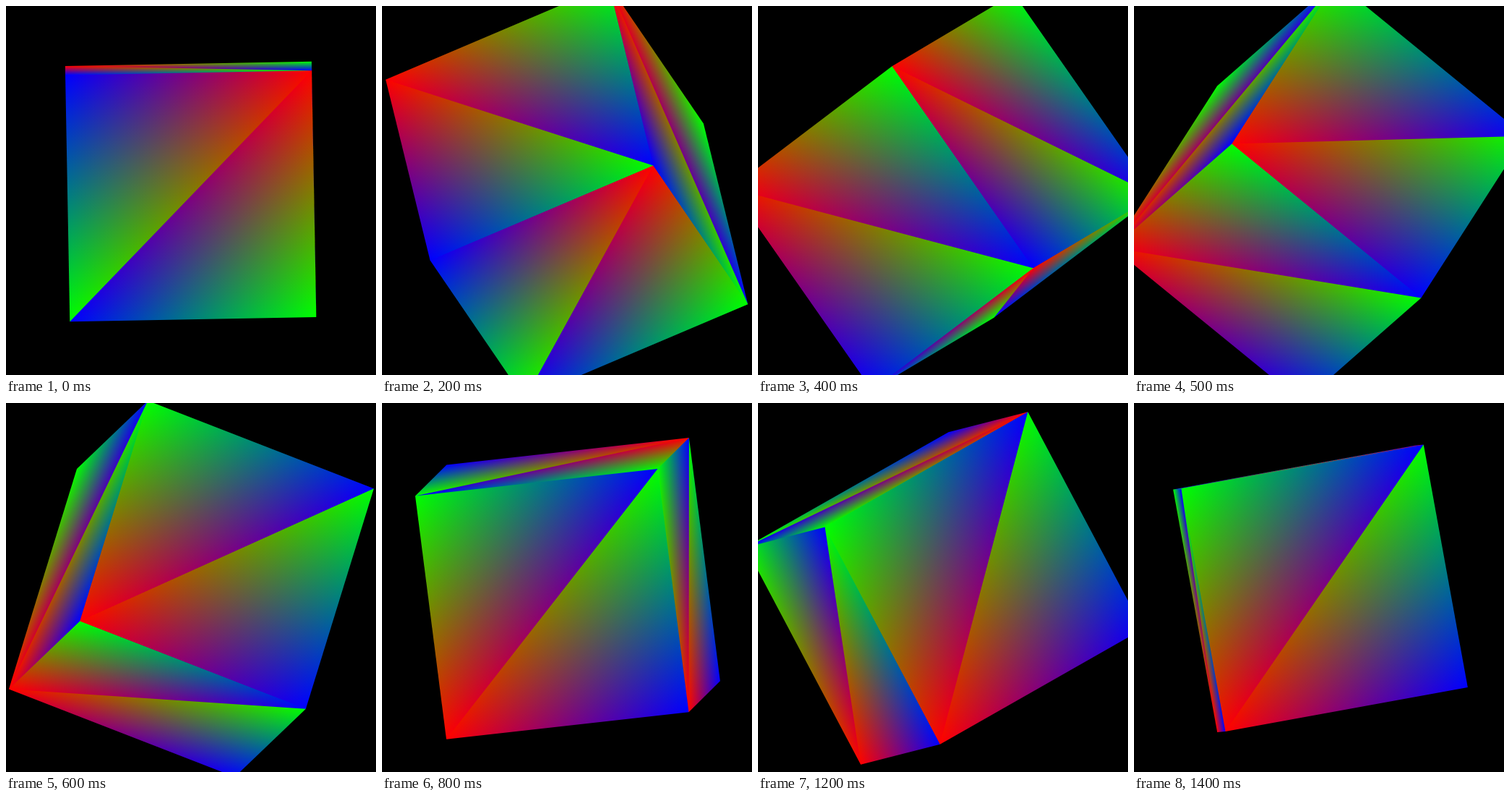
Write an HTML page with a canvas that moves like this. It is 512 px wide and 510 px high and loops after 1.5 s.

```html
<!DOCTYPE html>
<html lang="en">
<head>
<meta charset="utf-8">
<title>Rotating RGB cube</title>
<style>
  html, body { margin: 0; height: 100%; overflow: hidden; background: #000; }
  canvas { display: block; }
</style>
</head>
<body>
<canvas id="stage" width="512" height="510"></canvas>
<script>
const ctx = document.getElementById('stage').getContext('2d');
const SIZE = 341, CX = 256.8, CY = 256.5;
const PIVOT = [0.4965, 0.5, 0.5];
const STEP_MS = 100, STEPS = 15;
const START_ANGLE = 3.16, STEP_ANGLE = 0.21;
const COLORS = ['#f00', '#0f0', '#00f'];

// Corners as xyz bits, clockwise when seen from outside.
const FACES = [
  ['000', '010', '110', '100'],
  ['100', '110', '111', '101'],
  ['101', '111', '011', '001'],
  ['001', '011', '010', '000'],
  ['110', '010', '011', '111'],
  ['101', '001', '000', '100'],
];

// Turns about x, then z, then x again, all by the same angle.
function project(corner, angle) {
  const [x, y, z] = PIVOT.map((p, i) => corner[i] - p);
  const c = Math.cos(angle), s = Math.sin(angle);
  const y1 = y * c - z * s, z1 = y * s + z * c;
  const x2 = x * c + y1 * s, y2 = y1 * c - x * s;
  return [CX + SIZE * x2, CY - SIZE * (y2 * c + z1 * s)];
}

function drawTriangle(points) {
  const [a, b, c] = points;
  const area = (b[0] - a[0]) * (c[1] - a[1]) - (b[1] - a[1]) * (c[0] - a[0]);
  if (area <= 0.01) return;
  ctx.beginPath();
  points.forEach(p => ctx.lineTo(...p));
  ctx.closePath();
  // Each colour fades from its corner to the opposite edge.
  points.forEach((p, i) => {
    const q = points[(i + 1) % 3], r = points[(i + 2) % 3];
    const ex = r[0] - q[0], ey = r[1] - q[1];
    const k = area / (ex * ex + ey * ey);
    const fade = ctx.createLinearGradient(p[0], p[1], p[0] + ey * k, p[1] - ex * k);
    fade.addColorStop(0, COLORS[i]);
    fade.addColorStop(1, '#000');
    ctx.fillStyle = fade;
    ctx.fill();
  });
}

function draw(time) {
  const step = Math.floor(time / STEP_MS) % STEPS;
  const angle = START_ANGLE + STEP_ANGLE * step;
  ctx.globalCompositeOperation = 'source-over';
  ctx.fillStyle = '#000';
  ctx.fillRect(0, 0, 512, 510);
  ctx.globalCompositeOperation = 'lighter';
  for (const face of FACES) {
    const [a, b, c, d] = face.map(corner => project(corner, angle));
    drawTriangle([a, b, c]);
    drawTriangle([a, c, d]);
  }
}

function tick() {
  draw(performance.now());
  requestAnimationFrame(tick);
}
tick();
</script>
</body>
</html>
```
